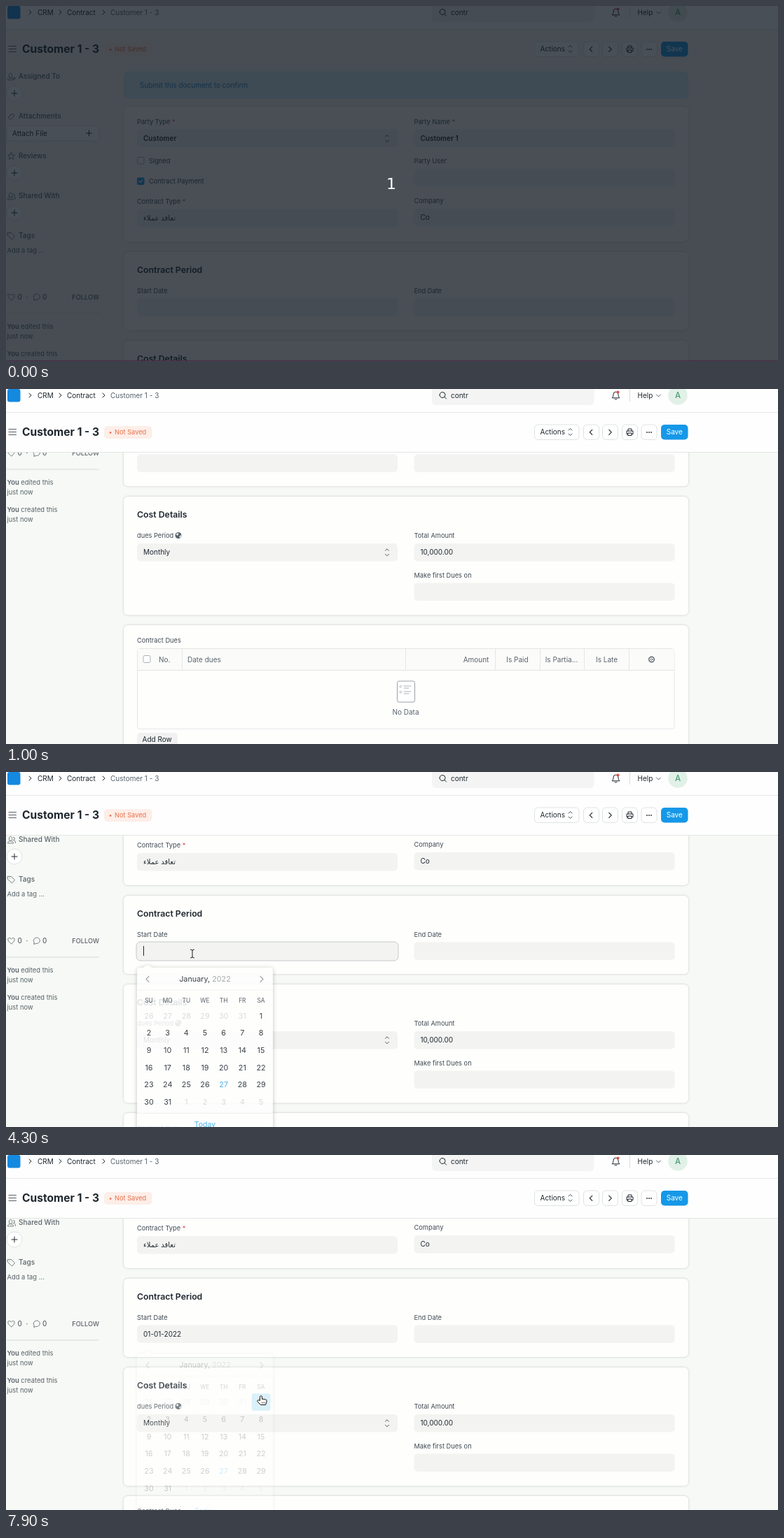
Recreate the animation shown at these times as an HTML page. Size 1102 px wide and 508 px high, loop 8000 ms.

```html
<!DOCTYPE html>
<html lang="en">
<head>
<meta charset="utf-8">
<title>Contract form</title>
<style>
html, body { margin: 0; width: 1102px; height: 508px; overflow: hidden; }
svg { display: block; font-family: Inter, "DejaVu Sans", sans-serif; }
text { white-space: pre; }
.icon { fill: none; stroke-linecap: round; stroke-linejoin: round; }
.card { fill: #fefefd; filter: drop-shadow(0 .5px 1.5px #0003); }
</style>
</head>
<body>
<svg id="stage" width="1102" height="508"></svg>
<script>
const INK = '#1f272e', LABEL = '#3f4951', GREY = '#59636b', BG = '#f6f9f5', FIELD = '#f3f3f2', BLUE = '#1698e8';
const LEFT = 187, RIGHT = 582.5, WIDTH = 372;

// y is the middle of the capital letters
const text = (x, y, s, { size = 10, fill = INK, weight = 400, anchor = 'start' } = {}) =>
  `<text x="${x}" y="${y + size * .363}" font-size="${size}" fill="${fill}" font-weight="${weight}" text-anchor="${anchor}">${s}</text>`;
const mid = (x, y, s, style) => text(x, y, s, { anchor: 'middle', ...style });
const rect = (x, y, w, h, fill, rx = 0, extra = '') =>
  `<rect x="${x}" y="${y}" width="${w}" height="${h}" fill="${fill}" rx="${rx}" ${extra}/>`;
const icon = (d, stroke = INK, width = 1, x = 0, y = 0) =>
  `<path class="icon" d="${d}" stroke="${stroke}" stroke-width="${width}" transform="translate(${x} ${y})"/>`;
const outline = (x, y, w, h, stroke = '#dfe2e2', rx = 5, fill = '#fff') => rect(x, y, w, h, fill, rx, `stroke="${stroke}"`);
const card = (y, h) => `<rect class="card" x="168" y="${y}" width="806" height="${h}" rx="6"/>`;
const label = (x, y, s, required) =>
  text(x, y, s + (required ? '<tspan fill="#e24c4c"> *</tspan>' : ''), { size: 9.25, fill: LABEL });
const field = (x, y, value = '', weight = 400) => rect(x, y, WIDTH, 25.5, FIELD, 5) + text(x + 9, y + 12.5, value, { weight });
const heading = (y, s) => text(LEFT, y, s, { size: 12.3, weight: 600 });
const updown = (x, y) => icon('M-2.5-2.5L0-5 2.5-2.5M-2.5 2.5L0 5 2.5 2.5', '#4c565e', 1, x, y);
const chevron = (x, y, dir, size = 3.5, stroke = INK, width = 1.2) =>
  icon(`M${-dir * size / 2}${-size}L${dir * size / 2} 0 ${-dir * size / 2} ${size}`, stroke, width, x, y);
const plus = (x, y) => icon('M-4 0H4M0-4V4', INK, 1, x, y);

function sidebar() {
  const person = 'M2 4a2.2 2.2 0 1 0 4 0a2.2 2.2 0 1 0-4 0M0 10C0 6 8 6 8 10Z';
  const sections = [
    [100.5, 'Assigned To', person + 'M8 8h3M9.5 6.5v3'],
    [157.5, 'Attachments', 'M2 6L6 2q2-1 3 1t-4 6q-3 1-4-1t5-6'],
    [214.5, 'Reviews', 'M5 0L6.4 3.5 10 3.8 7.2 6.2 8.2 10 5 7.9 1.8 10 2.8 6.2 0 3.8 3.6 3.5Z'],
    [271.5, 'Shared With', person + 'M8 2q2 0 2 2t-2 2q3 0 3 4'],
    [328.5, 'Tags', 'M0 1H5L10 6 6 10.5 0 5ZM2.5 3.2h.1'],
  ];
  let s = sections.map(([y, name, d]) =>
    icon(d, GREY, .8, 2.5, y - 5) + text(18, y, name, { weight: 500, fill: GREY })).join('');
  for (const y of [125, 239, 296]) s += `<circle cx="12" cy="${y}" r="11" fill="#fff" stroke="#dfe2e2"/>` + plus(12, y);
  const note = (y, what) => text(1.5, y, `<tspan font-weight="600">You</tspan> ${what} this`, { size: 9.4, fill: GREY })
    + text(1.5, y + 14, 'just now', { size: 9.4, fill: GREY });
  return s + outline(1, 171.5, 132, 21.5) + text(9, 182, 'Attach File') + plus(118.5, 182)
    + text(1.5, 350, 'Add a tag ...', { size: 9.4, fill: GREY })
    + icon('M5 9L1 5Q-1 1 2 .5 4 .5 5 2 6 .5 8 .5 11 1 9 5Z', GREY, .8, 2.5, 412)
    + text(16.5, 416.5, '0  ·', { fill: LABEL }) + text(52, 416.5, '0', { fill: LABEL })
    + icon('M2 9.5V7A4.5 4.3 0 1 1 5 9ZL2 9.5', GREY, .8, 38, 411.5)
    + text(133, 416.5, 'FOLLOW', { size: 9.2, anchor: 'end', fill: LABEL })
    + rect(1, 439.5, 132, 1, '#d8dcda') + note(458.5, 'edited') + note(498, 'created');
}

function table() {
  const line = '#e4e7e6', heads = [[671, 'Amount'], [730, 'Is Paid'], [793, 'Is Partia...'], [857.5, 'Is Late']];
  return label(LEFT, 685, 'Contract Dues') + outline(187.5, 696.5, 766.5, 115, line, 4, '#fefefd')
    + rect(188, 697, 765.5, 30, '#fbfbfa') + rect(187.5, 727, 766.5, 1, line)
    + [251, 570, 698, 762, 825, 889].map(x => rect(x, 697, 1, 30, line)).join('')
    + outline(196, 706.5, 10, 10, '#aab2b5', 2) + text(218, 712, 'No.', { fill: GREY }) + text(259, 712, 'Date dues', { fill: GREY })
    + heads.map(([x, s]) => mid(x, 712, s, { fill: GREY })).join('')
    + `<circle class="icon" cx="921.5" cy="712" r="3.8" stroke="${GREY}" stroke-width="1.4" stroke-dasharray="2 1"/>`
    + `<circle class="icon" cx="921.5" cy="712" r="1.4" stroke="${GREY}" stroke-width=".8"/>`
    + outline(558.5, 743, 25, 30, '#98a1a7', 2.5)
    + icon('M568 750h10M568 753h7M568 758h10M568 761h7M562 750.5l1.5-1.5 1.5 1.5-1.5 1.5ZM562 758.5l1.5-1.5 1.5 1.5-1.5 1.5Z', '#98a1a7', .8)
    + mid(570.5, 787, 'No Data', { fill: GREY }) + rect(187, 817, 58, 20, '#f0f1f0', 5) + text(194.5, 826.5, 'Add Row');
}

const page = () => sidebar()
  + rect(168, 94, 806, 38.5, '#d3e9f8', 5) + text(191, 113, 'Submit this document to confirm', { fill: '#1985c6' })
  + card(144, 193) + label(LEFT, 165.5, 'Party Type', 1) + field(LEFT, 176.5, 'Customer', 600) + updown(544, 189.5)
  + label(RIGHT, 165.5, 'Party Name', 1) + field(RIGHT, 176.5, 'Customer 1', 600)
  + outline(187.5, 216.5, 9.5, 9.5, '#aab2b5', 2) + label(204, 221.5, 'Signed')
  + rect(187, 245.5, 10.5, 10.5, BLUE, 2) + icon('M189.5 250.7l2 2 3.5-3.7', '#fff', 1.2) + label(204, 250.5, 'Contract Payment')
  + label(LEFT, 280, 'Contract Type', 1) + field(LEFT, 291, 'تعاقد عملاء')
  + label(RIGHT, 222, 'Party User') + field(RIGHT, 233) + label(RIGHT, 279, 'Company') + field(RIGHT, 290, 'Co')
  + card(352, 112) + heading(377.5, 'Contract Period')
  + label(LEFT, 408, 'Start Date') + field(LEFT, 418.5) + label(RIGHT, 408, 'End Date') + field(RIGHT, 418.5)
  + card(479, 169.5) + heading(504.5, 'Cost Details')
  + label(LEFT, 534.5, 'dues Period') + `<circle cx="246" cy="534.5" r="4.5" fill="${GREY}"/>`
  + `<path d="M242.5 532.5l3-1.5 1 2-2 2ZM247 536l3-2v2l-2 2Z" fill="#e8eaea"/>`
  + field(LEFT, 546, 'Monthly') + updown(544, 558.8)
  + label(RIGHT, 534.5, 'Total Amount') + field(RIGHT, 546, '10,000.00')
  + label(RIGHT, 592, 'Make first Dues on') + field(RIGHT, 602.5)
  + card(663, 220) + table();

function header() {
  const crumb = (x, s, fill = INK) => text(x, 9, s, { fill });
  return rect(0, 0, 1102, 33, '#fefefe') + rect(0, 33, 1102, 1, '#e6e9e7')
    + rect(2, 0, 18.5, 18.5, '#1589e0', 3)
    + [34.5, 77.5, 139.5].map(x => chevron(x, 9, 1, 3, INK, 1)).join('')
    + crumb(45, 'CRM') + crumb(87, 'Contract') + crumb(149, 'Customer 1 - 3', GREY)
    + rect(608, -8, 231.5, 31, '#f3f4f3', 6) + icon('M619 8.5a4 4 0 1 0 8 0a4 4 0 1 0-8 0M626 11.5l2.5 2.5') + crumb(635, 'contr')
    + icon('M865.5 12.5Q867 11 867 8 867 4 870.5 4T874 8Q874 11 875.5 12.5ZM869 14.5q1.5 1.5 3 0') + '<circle cx="873.5" cy="4.5" r="2" fill="#e24c4c"/>'
    + rect(890, 0, 1, 18, '#d8dcda') + crumb(901.5, 'Help') + icon('M928.5 8L931.5 11 934.5 8', GREY)
    + '<circle cx="959" cy="9" r="13.8" fill="#e2f1e8"/>' + mid(959, 9, 'A', { size: 11.5, fill: '#4b9f73', weight: 500 })
    + icon('M4 57.5H14.5M4 61.5H14.5M4 65.5H14.5', GREY)
    + text(23, 61, 'Customer 1 - 3', { size: 15.6, weight: 700 })
    + rect(140, 53, 68.5, 18, '#fdeee8', 5) + text(146.5, 62, '•', { size: 9.25, fill: '#e8704a' }) + text(155, 62, 'Not Saved', { size: 9.25, fill: '#e8704a' })
    + [[754.5, 63.5], [824.5, 22], [851.5, 22], [879.5, 22], [907, 22]].map(([x, w]) => outline(x, 51, w, 21.5)).join('')
    + text(762.5, 61.5, 'Actions') + updown(805.5, 61.5) + chevron(835, 61.8, -1) + chevron(862.5, 61.8, 1)
    + icon('M888 60v-3h5v3M888 64.5h-2v-4.5h9v4.5h-2M888 63h5v3.5h-5Z')
    + [915, 918, 921].map(x => `<circle cx="${x}" cy="62" r=".9" fill="${INK}"/>`).join('')
    + rect(935, 51, 38.5, 21.5, BLUE, 5) + mid(954.3, 61.5, 'Save', { fill: '#fff' });
}

const SIZE = 10.8, TODAY = '#31a7ea';

function days(hover, selected) {
  const col = i => 204 + i * 26.67, row = r => 348 + r * 24.65;
  let s = ['SU', 'MO', 'TU', 'WE', 'TH', 'FR', 'SA'].map((d, i) => mid(col(i), 326.5, d, { size: 8.4, fill: LABEL })).join('');
  if (hover || selected) s += rect(350.8, 335.8, 26.6, 24.6, selected ? '#5cc4ef' : '#f0f0f0', 3);
  for (let i = 0; i < 42; i++) {
    const n = i - 5, out = n < 1 || n > 31;
    const fill = out ? '#d4d7d8' : n === 27 ? TODAY : n === 1 && selected ? '#fff' : INK;
    s += mid(col(i % 7), row(i / 7 | 0), n < 1 ? n + 31 : n > 31 ? n - 31 : n, { size: SIZE, fill });
  }
  return s;
}

function months(hover) {
  const names = 'Jan Feb Mar Apr May Jun Jul Aug Sep Oct Nov Dec'.split(' ');
  return (hover ? rect(190.5, 314.5, 62.5, 32.5, '#f1f1f1', 3) : '')
    + names.map((m, i) => mid(221.7 + i % 3 * 62.2, 330.5 + (i / 3 | 0) * 33, m,
      { size: SIZE, fill: hover && !i ? '#858b8f' : INK })).join('');
}

function picker(t) {
  const open = Math.min(1, (t - 4100) / 230), shut = Math.max(0, (t - 7600) / 380), p = Math.min(open, 1 - shut);
  if (t < 4200) return '';
  const isMonths = t >= 6000 && t < 6800, bottom = isMonths ? 481 : 520, foot = bottom - 33;
  const title = isMonths ? '2022' : 'January, <tspan fill="#9c9fa1">2022</tspan>';
  return `<g opacity="${p}" transform="translate(0 ${7 * (1 - p)})">`
    + `<path d="M191 279H195.5L202 275 208.5 279H377q4 0 4 4V${bottom - 4}q0 4-4 4H191q-4 0-4-4V283q0-4 4-4Z" fill="#fefefe" style="filter:drop-shadow(0 1px 3px #0004)"/>`
    + (t >= 4700 && t < 6000 ? rect(241, 283, 86, 24, '#f0f0f0', 4) : '')
    + mid(284, 295, title, { size: SIZE }) + chevron(202, 295.5, -1, 4, '#8a9195') + chevron(365, 295.5, 1, 4, '#8a9195')
    + rect(187, 310.5, 194, 1, '#f0f1f0') + (isMonths ? months(t >= 6100) : days(t >= 7200, t >= 7700))
    + rect(187, foot, 194, 1, '#f0f1f0') + mid(284, foot + 16.5, 'Today', { size: SIZE - .3, fill: TODAY }) + '</g>';
}

// Tip of the arrow and the hand, middle of the beam
const SHAPES = {
  arrow: '<path d="M0 0V13L3 10.3 5 15 7.2 14 5.2 9.5H9.5Z" fill="#111" stroke="#fff" stroke-width=".8"/>',
  beam: icon('M-2.5-6Q0-6 0-4.5Q0-6 2.5-6M0-4.5V4.5M-2.5 6Q0 6 0 4.5Q0 6 2.5 6', '#fff', 2.4)
    + icon('M-2.5-6Q0-6 0-4.5Q0-6 2.5-6M0-4.5V4.5M-2.5 6Q0 6 0 4.5Q0 6 2.5 6', '#111', 1),
  hand: '<path d="M-1.5 7V1Q0-1 1.5 1V5Q3 3.8 4 5.2 5.4 4.2 6.2 5.6 8 5 8 7V9.5L6.5 13H-.5L-5.2 8Q-5.2 5.8-3.2 6.2Z" fill="#fff" stroke="#111" stroke-linejoin="round"/><path d="M1.5 9v2M3.5 9v2M5.5 9v2" stroke="#111" stroke-width=".7"/>',
};
const MOVES = [
  [1600, 635, 185, 'arrow'], [1700, 735, 190, 'arrow'], [1800, 845, 198, 'arrow'], [1900, 904, 202, 'arrow'], [2100],
  [3100, 1030, 194, 'arrow'], [3200, 358, 260, 'beam'], [3400, 348, 266, 'beam'], [3500, 322, 271, 'beam'],
  [3600, 288, 266, 'beam'], [3700, 266, 260, 'beam'], [4500, 270, 274, 'arrow'], [4600, 275, 287, 'arrow'],
  [4700, 281, 302, 'hand'], [4900, 284, 310, 'hand'], [5000, 282, 300, 'hand'], [6000, 250, 318, 'arrow'],
  [6100, 217, 330, 'arrow'], [6300, 217, 330, 'hand'], [6900, 252, 335, 'hand'], [7000, 296, 341, 'hand'],
  [7100, 336, 345, 'hand'], [7200, 358, 345, 'hand'], [7300, 364, 344.5, 'hand'],
];
function cursor(t) {
  const [, x, y, kind] = MOVES.findLast(m => m[0] <= t) || [];
  return kind ? `<g transform="translate(${x} ${y})">${SHAPES[kind]}</g>` : '';
}

const ease = (t, from, to) => {
  const p = Math.max(0, Math.min(1, (t - from) / (to - from)));
  return p * p * (3 - 2 * p);
};
const within = (t, spans) => spans.some(([a, b]) => t >= a && t < b);

function focusRing(t) {
  if (!within(t, [[4200, 5300], [6000, 6500], [6800, 7500]])) return '';
  return outline(186, 243, 374, 27, '#c3cac8', 6, FIELD) + rect(196, 249, 1, 14, INK);
}

const stage = document.getElementById('stage');
stage.innerHTML = rect(0, 0, 1102, 508, BG) + `<g id="page">${page()}</g><g id="top">`
  + rect(0, 33, 1102, 57.5, BG, 0, 'id="head"') + rect(0, 90, 1102, 1, '#e3e7e4', 0, 'id="edge"') + header()
  + '</g><g id="live"></g><g id="shade">' + rect(0, 0, 1102, 508, '#101822', 0, 'opacity=".76"')
  + rect(0, 507, 1102, 1, '#4a2b49')
  + '<text x="550" y="262" font-size="22" fill="#fff" text-anchor="middle" font-family="DejaVu Sans, sans-serif">1</text></g>';
const [pageEl, head, edge, live, shade] = ['page', 'head', 'edge', 'live', 'shade'].map(id => document.getElementById(id));

let shown = -1;
function draw(now) {
  const t = Math.floor(now % 8000 / 100) * 100;
  if (t !== shown) {
    shown = t;
    const scroll = 325 * ease(t, 500, 1000) - 150 * ease(t, 2500, 2800);
    pageEl.setAttribute('transform', `translate(0 ${-Math.round(scroll)})`);
    head.setAttribute('fill', scroll ? '#fefefe' : BG);
    edge.style.display = scroll ? '' : 'none';
    shade.style.display = t < 300 ? '' : 'none';
    live.innerHTML = focusRing(t) + (t >= 7700 ? text(196, 256, '01-01-2022') : '') + picker(t) + cursor(t);
  }
  requestAnimationFrame(draw);
}
const start = performance.now();
draw(0);
requestAnimationFrame(function tick() {
  draw = (frame => () => frame(performance.now() - start))(draw);
  draw();
});
</script>
</body>
</html>
```
